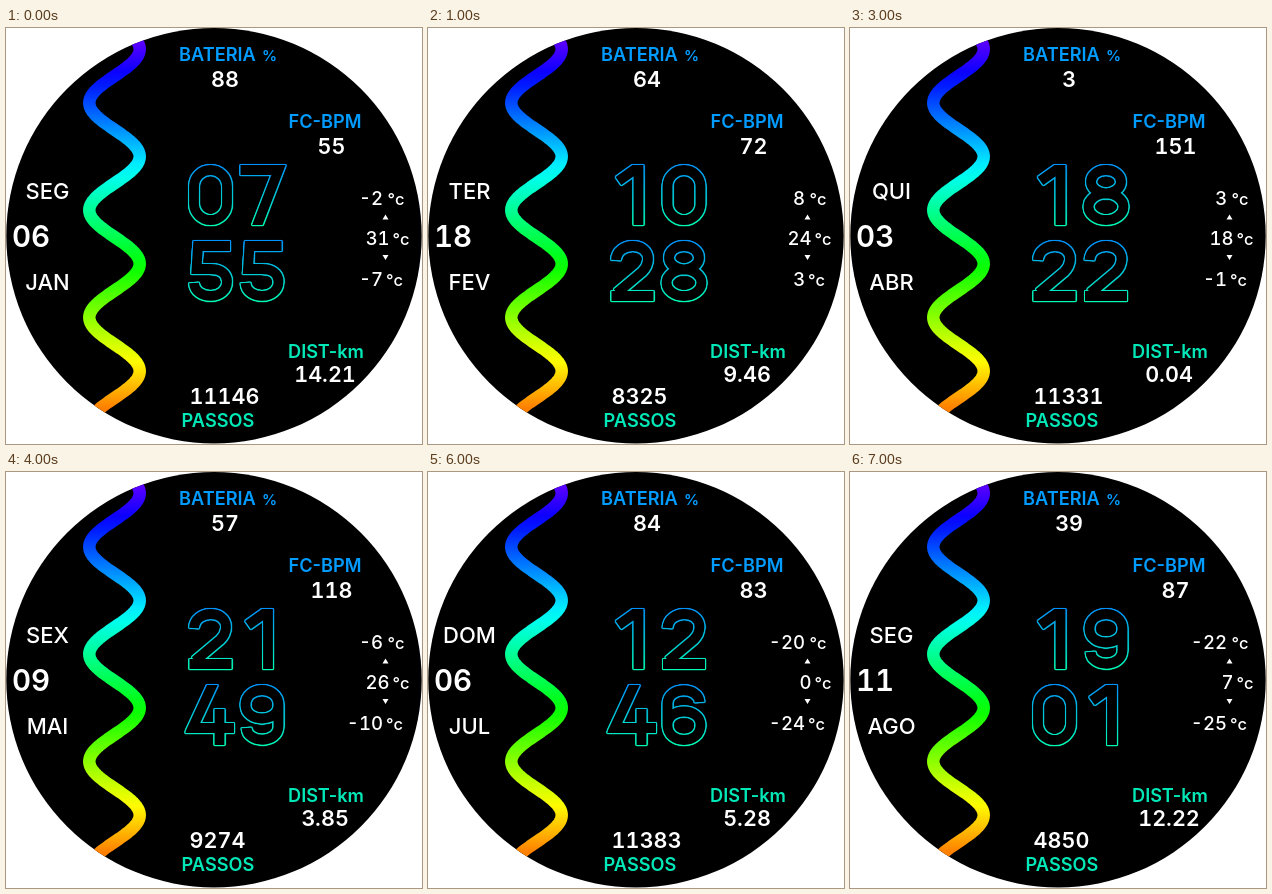
These frames come from a looping animation (416x416 px, 8 s). An HTML page with a canvas:

```html
<!DOCTYPE html>
<html lang="pt">
<head>
<meta charset="utf-8">
<title>Mostrador</title>
<style>
  html, body { margin: 0; width: 100%; height: 100%; overflow: hidden; background: #fff; }
  canvas, svg { position: absolute; left: 0; top: 0; width: 416px; height: 416px; }
  text { font: 600 21.6px Inter, sans-serif; font-variant-numeric: tabular-nums; fill: #fff; }
  .label { font-size: 18.2px; font-variant-numeric: normal; }
  .blue { fill: #009cff; }
  .teal { fill: #00e8b8; }
  .date { font-size: 22px; font-weight: 500; }
  .day { font-size: 29.5px; }
  .temp { font-size: 18.6px; font-weight: 500; }
  .unit { font-size: 16.5px; font-weight: 500; }
  .percent { font-size: 15px; }
</style>
</head>
<body>
<canvas id="stage" width="416" height="416"></canvas>
<svg id="texts" viewBox="0 0 416 416">
  <path d="M379.5 186.5l3 5h-6zM379.5 232l3-5h-6z" fill="#fff"/>
</svg>
<script>
const SIZE = 416, STEP = 1000;

// weekday, day, month, time, battery, pulse, distance, steps, high, now, low
const STATES = [
  ['SEG', '06', 'JAN', '0755', '88', '55', '14.21', '11146', '-2', '31', '-7'],
  ['TER', '18', 'FEV', '1028', '64', '72', '9.46', '8325', '8', '24', '3'],
  ['QUA', '12', 'MAR', '1436', '39', '90', '7.23', '10689', '13', '1', '9'],
  ['QUI', '03', 'ABR', '1822', '3', '151', '0.04', '11331', '3', '18', '-1'],
  ['SEX', '09', 'MAI', '2149', '57', '118', '3.85', '9274', '-6', '26', '-10'],
  ['SÁB', '21', 'JUN', '0733', '82', '179', '6.69', '6496', '-11', '13', '-15'],
  ['DOM', '06', 'JUL', '1246', '84', '83', '5.28', '11383', '-20', '0', '-24'],
  ['SEG', '11', 'AGO', '1901', '39', '87', '12.22', '4850', '-22', '7', '-25']
];

// Centre lines of the large digits in a 33 x 50 cell
const DIGITS = [
  'M0 16.5A16.5 16.5 0 0 1 33 16.5V33.5A16.5 16.5 0 0 1 0 33.5Z',
  'M22.5 55V0H18L2.5 11',
  'M0 14C1 -4.5 32 -4.5 32 13C32 19 29 23 26 26L1 47M-4.5 50H37.5',
  'M1 12C2 -4 31 -4 31 12C31 20 26 23.5 18 23.5H11M18 23.5C28 23.5 33 29 33 36C33 54.5 0 54.5 0 37',
  'M23 -15L-1.5 38H40M25.5 19V55',
  'M36 0H4L2.5 23H16C27 23 33 28 33 35.5C33 54.5 1 54.5 0 37',
  'M32 12C31 -4 0 -4 0 14V35C0 55 33 55 33 35C33 17 0 17 0 35',
  'M-5 0H33L8 65',
  'M16.5 0A15 11.7 0 0 1 16.5 23.4A15 11.7 0 0 1 16.5 0ZM16.5 23.4A17.5 13.3 0 0 1 16.5 50A17.5 13.3 0 0 1 16.5 23.4Z',
  'M1 38C2 54 33 54 33 36V15C33 -5 0 -5 0 15C0 33 33 33 33 15'
].map(d => new Path2D(d));
const COLUMNS = [188, 239.5], ROWS = [142, 218];
const THICKNESS = 9.8, LINE = 1.1;

const ctx = document.getElementById('stage').getContext('2d');
const svg = document.getElementById('texts');

function newLayer() {
  const canvas = document.createElement('canvas');
  canvas.width = canvas.height = SIZE;
  return canvas.getContext('2d');
}
const mask = newLayer(), outline = newLayer();

function addText(x, y, anchor, style, content = '') {
  const node = document.createElementNS('http://www.w3.org/2000/svg', 'text');
  node.setAttribute('x', x);
  node.setAttribute('y', y);
  node.setAttribute('text-anchor', anchor);
  node.setAttribute('class', style);
  node.textContent = content;
  svg.append(node);
  return node;
}

addText(173, 33, 'start', 'label blue', 'BATERIA');
addText(256, 33, 'start', 'percent blue', '%');
addText(319, 100, 'middle', 'label blue', 'FC-BPM');
addText(320, 330, 'middle', 'label teal', 'DIST-km');
addText(212, 399, 'middle', 'label teal', 'PASSOS');
addText(398.5, 177, 'end', 'unit', '°c');
addText(403.5, 217, 'end', 'unit', '°c');
addText(397, 258, 'end', 'unit', '°c');

const fields = {
  0: addText(41.5, 171, 'middle', 'date'),
  1: addText(25, 218.5, 'middle', 'day'),
  2: addText(41.5, 262, 'middle', 'date'),
  4: addText(219, 59, 'middle', ''),
  5: addText(325.5, 125.5, 'middle', ''),
  6: addText(319, 353.5, 'middle', ''),
  7: addText(183.5, 376, 'start', ''),
  8: addText(377, 176.5, 'end', 'temp'),
  9: addText(383.5, 216.5, 'end', 'temp'),
  10: addText(377, 258, 'end', 'temp')
};

function drawWave() {
  const rainbow = ctx.createLinearGradient(0, 13, 0, 380);
  for (let i = 0; i <= 24; i++) {
    rainbow.addColorStop(i / 24, `hsl(${262 - 232 * i / 24} 100% 50%)`);
  }
  ctx.beginPath();
  for (let y = 0; y <= SIZE; y++) {
    ctx.lineTo(108.5 + 25.2 * Math.cos((y - 128.5) / 107.3 * 2 * Math.PI), y);
  }
  ctx.strokeStyle = rainbow;
  ctx.lineWidth = 12.5;
  ctx.lineJoin = 'round';
  ctx.stroke();
}

function drawClock(time) {
  mask.clearRect(0, 0, SIZE, SIZE);
  mask.lineWidth = THICKNESS;
  [...time].forEach((digit, i) => {
    mask.save();
    mask.translate(COLUMNS[i % 2], ROWS[i >> 1]);
    mask.beginPath();
    mask.rect(-8.5, -THICKNESS / 2, 50, 50 + THICKNESS);
    mask.clip();
    mask.stroke(DIGITS[digit]);
    mask.restore();
  });

  // Widen the shape, colour it, then cut the shape out again
  outline.globalCompositeOperation = 'source-over';
  outline.clearRect(0, 0, SIZE, SIZE);
  for (let i = 0; i < 16; i++) {
    const angle = i * Math.PI / 8;
    outline.drawImage(mask.canvas, LINE * Math.cos(angle), LINE * Math.sin(angle));
  }
  outline.globalCompositeOperation = 'source-atop';
  for (const y of ROWS) {
    const shade = outline.createLinearGradient(0, y - 7, 0, y + 57);
    shade.addColorStop(0, '#0090ff');
    shade.addColorStop(1, '#00ffb4');
    outline.fillStyle = shade;
    outline.fillRect(0, y - 12, SIZE, 74);
  }
  outline.globalCompositeOperation = 'destination-out';
  outline.drawImage(mask.canvas, 0, 0);
  ctx.drawImage(outline.canvas, 0, 0);
}

function show(state) {
  ctx.clearRect(0, 0, SIZE, SIZE);
  ctx.save();
  ctx.beginPath();
  ctx.arc(208, 207.7, 207.7, 0, 2 * Math.PI);
  ctx.fillStyle = '#000';
  ctx.fill();
  ctx.clip();
  drawWave();
  drawClock(state[3]);
  ctx.restore();
  for (const key in fields) fields[key].textContent = state[key];
}

const start = performance.now();
let current = -1;
function tick() {
  const index = Math.floor((performance.now() - start) / STEP) % STATES.length;
  if (index !== current) show(STATES[current = index]);
  requestAnimationFrame(tick);
}
tick();
</script>
</body>
</html>
```
